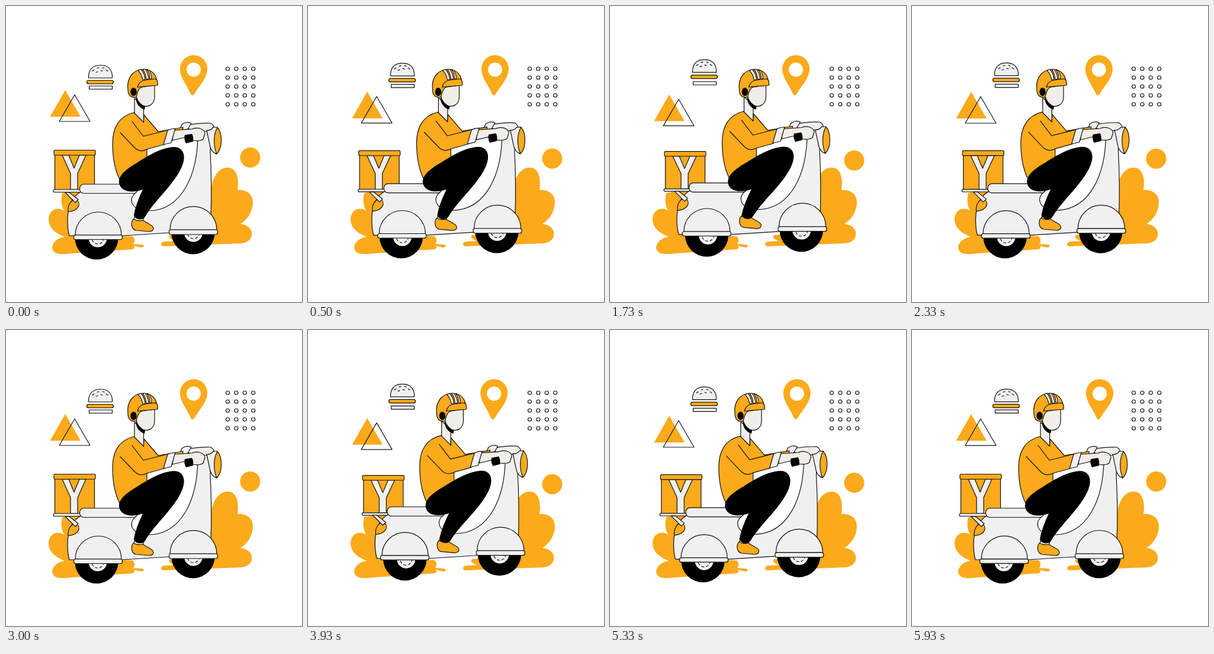
Animation of 500 by 500 pixels, one loop 6010 ms. Source, as an HTML page:

```html
<!DOCTYPE html>
<html lang="en">
<head>
<meta charset="utf-8">
<title>Scooter delivery</title>
<style>
html, body { margin: 0; width: 100%; height: 100%; overflow: hidden; background: #fff; }
svg { display: block; width: 100vw; height: 100vh; }
.o { fill: #fbaa1b; }
.g { fill: #f0f0f0; }
.s { fill: #f0eee8; }
.w { fill: #fff; }
.k { fill: #000; }
.n { fill: none; }
.l { stroke: #111; stroke-width: 1.2; stroke-linejoin: round; stroke-linecap: round; }
</style>
</head>
<body>
<svg id="stage" viewBox="0 0 500 500">
  <!-- still scenery -->
  <g class="o">
    <path d="M95 316C92 330 94 340 99 346C85 337 72 346 72 360C72 378 88 385 99 390C84 392 78 402 78 409C80 420 92 420 110 418L214 411Q220 408 215 405L228 408Q237 406 230 403L215 402Q220 395 214 389L190 388L130 310Z"/>
    <path d="M347 305C352 281 364 272 376 273C390 274 394 292 391 311C405 309 418 318 417 333C416 350 406 362 396 368C410 370 417 378 415 388C414 396 404 401 396 401L265 406Q258 402 266 398L285 397Q272 392 277 387L345 380Z"/>
  </g>
  <g id="dots" class="n l"></g>

  <circle id="ball" class="o" cx="412.5" cy="256" r="17"/>
  <g id="triangles">
    <path class="o" d="M100 142L126 187H74.500Z"/>
    <path class="n l" d="M116 150L142 195H90Z"/>
  </g>
  <g id="pin">
    <path class="o" d="M294 106A23 23 0 1 1 340 106C340 122 327 134 318 149Q315 153 312 149C306 133 294 122 294 106Z"/>
    <circle class="w" cx="317" cy="107.500" r="12"/>
  </g>
  <g id="bun">
    <path class="g l" d="M139.500 121.500V117C141 105 149 100 159.500 100C170 100 178 105 179.500 117V121.500Z"/>
    <path class="n l" d="M146 110l3-2M154 105l3-1M163 104l3 1M152 112l3-1M160 109l3 1M169 108l3 2"/>
  </g>
  <rect id="patty" class="o l" x="136.500" y="125.500" width="45" height="6" rx="3"/>
  <rect id="base" class="g l" x="140.500" y="135" width="39" height="5.500"/>

  <g id="box">
    <rect class="o l" x="82.500" y="250" width="67" height="61"/>
    <path class="g l" d="M95 252H106L115 274L124 252H135L121 283V310H109V283Z"/>
    <rect class="o l" x="81" y="243.500" width="70" height="8.500" rx="1.500"/>
    <rect class="g l" x="80" y="310" width="48" height="4.500" rx="2"/>
  </g>

  <g id="body">
    <path class="g l" d="M128 313C110 322 104 342 104 362Q104 378 107 388L197 388L277 383L346 360Q348 300 345 246L346 208Q334 204 324 216C324 287 296 345 241 346C214 346 207 330 216 318Q223 314 221 308Z"/>
    <path class="o l" d="M105 347C104 335 111 327 118 327C127 332 125 345 106 347.500Z"/>
    <path class="g l" d="M100 315H107L122 327L117 332Z"/>
    <rect class="g l" x="124.500" y="301" width="98" height="15.500" rx="7"/>
  </g>

  <g id="rearWheel">
    <circle class="k" cx="153" cy="391.500" r="36.700"/>
    <circle class="g" cx="155" cy="392" r="15.500"/>
    <circle class="n l" cx="155" cy="392" r="10" stroke-dasharray="4 4"/>
  </g>
  <g id="rearFender">
    <path class="g l" d="M117 387A39 39 0 0 1 195 387Z"/>
    <rect class="g l" x="114.500" y="387" width="82" height="7.500" rx="3"/>
  </g>
  <g id="frontWheel">
    <circle class="k" cx="316" cy="382.500" r="36.700"/>
    <circle class="g" cx="316.500" cy="383" r="15.500"/>
    <circle class="n l" cx="316.500" cy="383" r="10" stroke-dasharray="4 4"/>
  </g>
  <g id="frontFender">
    <path class="g l" d="M277 378A39.500 39.500 0 0 1 356 378Z"/>
    <rect class="g l" x="275.500" y="378" width="82" height="8" rx="3"/>
  </g>

  <g id="farHand">
    <path class="s l" d="M308 201Q328 197 346 198Q354 203 351 209L330 213L306 207Z"/>
    <path class="g l" d="M297 200Q305 194 313 198L307 208L293 210Z"/>
  </g>
  <g id="foot">
    <path class="s l" d="M219 350L215 364L229 368L235 352Z"/>
    <path class="o l" d="M215 360C210 367 212 378 220 379L242 381C251 380 251 373 243 369L231 362Q223 364 215 360Z"/>
  </g>
  <g id="torso">
    <path class="s l" d="M217 156V186L232.500 198V168Z"/>
    <path class="o l" d="M216 180C190 186 180 207 180 232C180 262 186 284 196 300L238 272V240L258 228L298 213L299 205L257 212L233 184L232.500 196.500Z"/>
    <path class="o" d="M214 195L232 220L272 210L267 234L238 242Q226 248 218 240L196 214Z"/>
    <path class="n l" d="M213 195L232 220L272 210M267 234L238 242Q227 248 218 240L193 214"/>
  </g>
  <path id="pants" class="k" d="M191 299C190 286 202 276 221 265C250 246 271 237 288 238.500C302 242 303 256 298 269C286 300 251 328 235 356C229 364 217 360 216 353Q219 335 231 310C214 316 194 315 191 299Z"/>

  <g id="lamp">
    <path class="g l" d="M339 210Q345 211 350 205H357L355 250Q347 246 345 238Z"/>
    <path class="o l" d="M357 205C366 215 366 240 356 250C350 236 350 218 357 205Z"/>
  </g>
  <g id="hand">
    <path class="s l" d="M283 210L314 208Q320 205 328 207Q336 210 336 215L333 225Q327 229 315 227L302 222L281 227Z"/>
    <path class="k" d="M302 218L314 216Q317 220 316 229L304 232Q300 225 302 218Z"/>
    <path class="g l" d="M273 210Q279 207 286 207L279 231L266 234Z"/>
  </g>
  <g id="head">
    <path class="k" d="M219 152Q222 164 236 166L234 175C225 172 219 165 219 152Z"/>
    <path class="s l" d="M222 138L251 134V155C250 166 241 172 231 168Q222 162 220 152Z"/>
    <path class="o l" d="M206 142C203 118 218 107 232 107C247 107 255 116 256 133L232 136C223 138 222 146 220 154C211 156 206 150 206 142Z"/>
    <path class="w l" d="M223 109L228 107Q234 114 235 124L231 125Q229 114 223 109ZM231 107H235Q240 114 241 123L237 124Q236 113 231 107ZM238 107L242 109Q246 115 246 123L243 123Q243 113 238 107Z"/>
    <path class="o l" d="M222 137Q225 126 236 125L253 123Q257 126 256 134L232 136Z"/>
    <ellipse class="k" cx="215.500" cy="145" rx="5.200" ry="7"/>
  </g>
</svg>
<script>
const LOOP = 6010, CYCLE = 3000, REACH = 1.15;
const byId = id => document.getElementById(id);

let dots = "";
for (let row = 0; row < 5; row++)
  for (let col = 0; col < 4; col++)
    dots += `<circle cx="${374.5 + col * 14.4}" cy="${106 + row * 15}" r="3"/>`;
byId("dots").innerHTML = dots;

const LATE = 1330, EARLY = 1250;
// id: [dx, dy, peak time in ms, skew, squash, y that skew and squash leave still]
const parts = {
  ball: [0, 5, LATE],
  triangles: [0, 7.5, LATE],
  pin: [-3, 0, LATE],
  bun: [0, -9.5, LATE],
  patty: [0, -9, LATE],
  base: [0, -7.3, LATE],
  box: [11.6, 0.4, EARLY, 0, 0.052, 279],
  body: [9.5, -2.3, EARLY],
  rearWheel: [11, -5, EARLY],
  rearFender: [8.2, -6.3, EARLY],
  frontWheel: [7.6, -4.2, EARLY],
  frontFender: [9, -5.6, EARLY],
  farHand: [8.5, -2, LATE],
  foot: [6.5, -5, LATE],
  torso: [9.5, -2, LATE],
  pants: [10, -0.6, LATE, -0.032, 0, 245],
  lamp: [7.8, -1, LATE],
  hand: [9, -2.5, LATE],
  head: [12.5, 0, LATE]
};
const list = Object.entries(parts).map(([id, move]) => [byId(id), ...move]);

// quick swing out, slower return
function swing(t, peak) {
  const p = t < peak ? t / peak : (CYCLE - t) / (CYCLE - peak);
  return REACH * (1 - Math.cos(Math.PI * p)) / 2;
}

function draw(now) {
  const t = Math.min(now % LOOP, 2 * CYCLE) % CYCLE;
  for (const [el, dx, dy, peak, skew = 0, squash = 0, mid = 0] of list) {
    const s = swing(t, peak);
    const x = (dx - skew * mid) * s, y = (dy + squash * mid) * s;
    el.setAttribute("transform", `matrix(1 0 ${skew * s} ${1 - squash * s} ${x} ${y})`);
  }
}

const start = performance.now();
function tick() {
  draw(performance.now() - start);
  requestAnimationFrame(tick);
}
tick();
</script>
</body>
</html>
```
